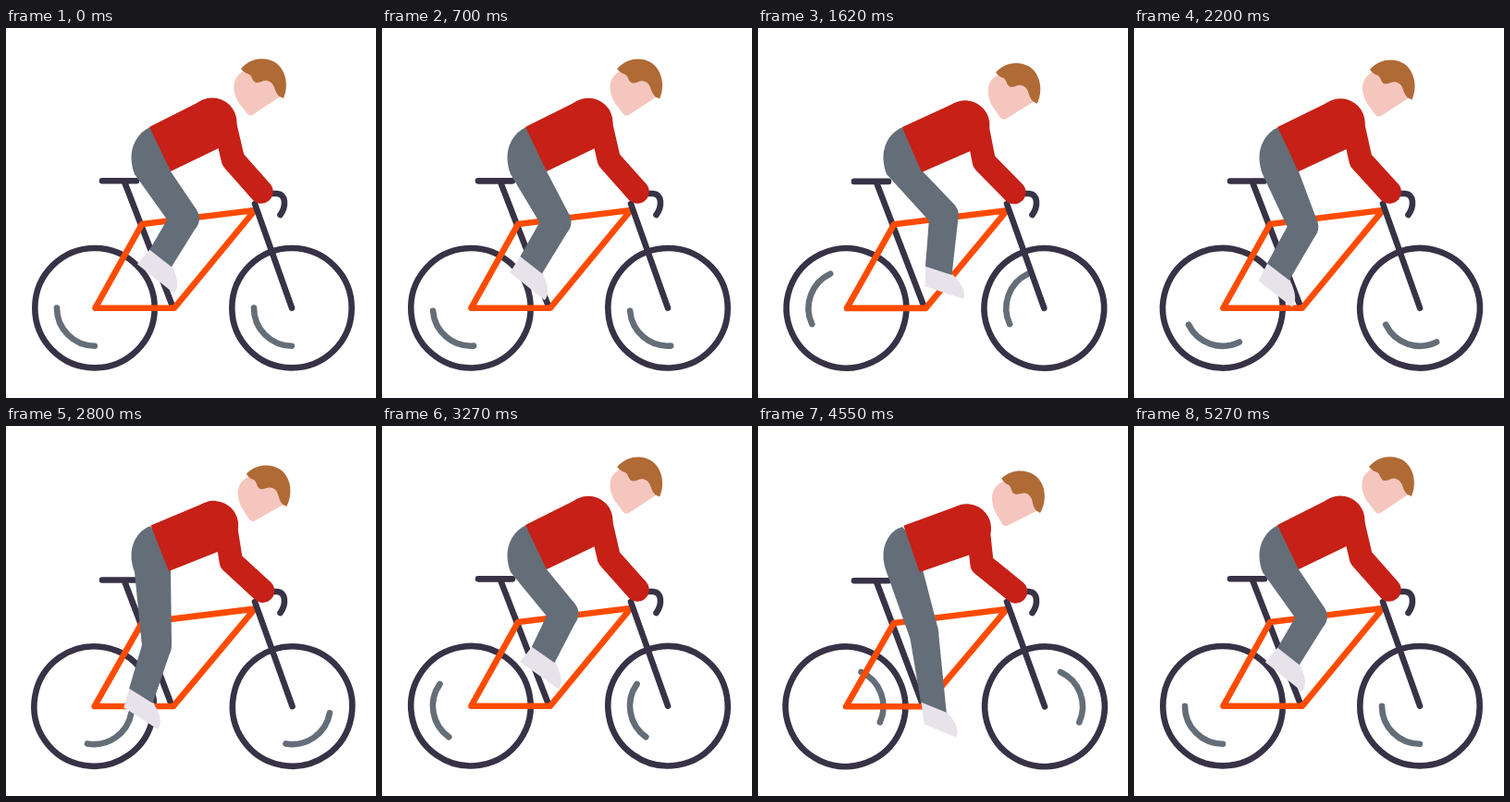
These frames come from a looping animation (400x400 px, 8 s). An HTML page with a canvas:

```html
<!DOCTYPE html>
<html lang="en">
<head>
<meta charset="utf-8">
<title>Cyclist</title>
<style>
  html, body { margin: 0; width: 100%; height: 100%; overflow: hidden; background: #fff; }
  canvas { display: block; width: 400px; height: 400px; }
</style>
</head>
<body>
<canvas id="stage" width="400" height="400"></canvas>
<script>
const ctx = document.getElementById('stage').getContext('2d');
const DARK = '#373246', ORANGE = '#ff4b00', GREY = '#646e78', RED = '#c62017';
const SKIN = '#f5c6be', HAIR = '#b06a35', SHOE = '#e8e2eb';
const LOOP = 8000, RIDE = 5.27, TAU = Math.PI * 2;

// Turns made by the wheels and the pedals over time (seconds); the outer knots only set end speeds.
const TIMES = [-0.7, 0, 0.7, 1.62, 2.8, 3.77, 4.55, RIDE, 5.99];
const WHEEL = [-0.3, 0, 0.986, 3.178, 6.775, 9.314, 10.567, 11, 10.567];
const PEDAL = [-0.3, 0, 0.95, 3.186, 6.714, 9.272, 10.45, 11, 10.45];

// Leg poses around one pedal turn.
const cyclic = v => [v[5], ...v, v[0], v[1]];
const PHASES = [-0.05, 0, 0.186, 0.272, 0.45, 0.714, 0.95, 1, 1.186];
const LEG = {
  kneeX: cyclic([193, 201, 200, 179.5, 163, 188.5]),
  kneeY: cyclic([206, 202, 213, 224, 238, 210]),
  ankleX: cyclic([167, 195, 202, 190, 146, 161]),
  ankleY: cyclic([249, 262, 275, 304, 292, 256.5]),
  tilt: cyclic([38, 18, 9, 22, 32, 38]),
  heel: cyclic([-16, -9, -7, -3, -9, -13])
};

function spline(xs, ys, x) {
  let i = 1;
  while (i < xs.length - 3 && x > xs[i + 1]) i++;
  const slope = k => (ys[k + 1] - ys[k]) / (xs[k + 1] - xs[k]);
  const tangent = k => {
    const a = xs[k] - xs[k - 1], b = xs[k + 1] - xs[k];
    return (slope(k - 1) * b + slope(k) * a) / (a + b);
  };
  const h = xs[i + 1] - xs[i], u = (x - xs[i]) / h, v = 1 - u;
  return ys[i] * (1 + 2 * u) * v * v + ys[i + 1] * (3 - 2 * u) * u * u
    + h * u * v * (tangent(i) * v - tangent(i + 1) * u);
}

function fill(d, color) {
  ctx.fillStyle = color;
  ctx.fill(new Path2D(d));
}

function stroke(d, color, width = 6.6) {
  ctx.strokeStyle = color;
  ctx.lineWidth = width;
  ctx.lineCap = ctx.lineJoin = 'round';
  ctx.stroke(new Path2D(d));
}

function disc(x, y, r, color) {
  ctx.fillStyle = color;
  ctx.beginPath();
  ctx.arc(x, y, r, 0, TAU);
  ctx.fill();
}

function placed(x, y, angle, draw) {
  ctx.save();
  ctx.translate(x, y);
  ctx.rotate(angle);
  draw();
  ctx.restore();
}

function wheel(x, y, angle) {
  placed(x, y, angle, () => {
    stroke('M64.7 0A64.7 64.7 0 1 1 -64.7 0A64.7 64.7 0 1 1 64.7 0Z', DARK);
    stroke('M0 41A41 41 0 0 1 -41 0', GREY);
  });
}

function bike(dip, turn) {
  const rear = 96 - 1.5 * dip, front = 309 + dip, axle = 302.7 + 0.6 * dip;
  const seat = 165.3 + 2 * dip, base = 182 - 2 * dip;
  wheel(rear, axle, turn);
  wheel(front, axle, turn);
  stroke(`M128 ${seat + 1}L${base - 2} ${axle - 2}M104 ${seat}H141`, DARK);
  stroke(`M${rear + 0.5} ${axle}L147 ${212 + dip}L269 ${197 + dip}L${base} ${axle}Z`, ORANGE);
  stroke(`M269 190L${front} ${axle}`, DARK);
  stroke('M287 179H293C303 180 303 193 296.5 202', DARK);
}

function leg(phase, dip) {
  const p = {};
  for (const key in LEG) p[key] = spline(PHASES, LEG[key], phase);
  const { kneeX: kx, kneeY: ky, ankleX: ax, ankleY: ay } = p;
  const side = (angle, r) => [Math.sin(angle) * r, -Math.cos(angle) * r];
  const [tx, ty] = side(Math.atan2(ky - 154, kx - 158), 16);
  const [sx, sy] = side(Math.atan2(ay - ky, ax - kx), 15.7);
  const tilt = p.tilt * Math.PI / 180;
  const cx = Math.cos(tilt) * 15, cy = Math.sin(tilt) * 15;

  fill(`M156 ${107 + 2 * dip}C142 113 135 128 135.5 141Q136 151 139 158L178 155L170 125Z`, GREY);
  fill(`M139 158L160 130L178 155L${kx + tx} ${ky + ty}L${kx - tx} ${ky - ty}Z`, GREY);
  disc(kx, ky, 15.9, GREY);
  placed(ax, ay, tilt, () =>
    fill(`M-15 -1L${p.heel} 20.5L35 21C35 13 30 7 15 -1Z`, SHOE));
  fill(`M${kx + sx} ${ky + sy}L${ax + cx} ${ay + cy}L${ax - cx} ${ay - cy}L${kx - sx} ${ky - sy}Z`, GREY);
}

function rider(dip) {
  ctx.save();
  ctx.translate(150, 128);
  ctx.rotate(dip * 6.9 * Math.PI / 180);
  ctx.translate(-150, -128);
  fill('M155 107L211.5 78.5L240 100L236 127L178 155Z', RED);
  disc(223, 102, 26.5, RED);
  fill('M256 47C246 53 245 63 247.5 71C249 79 256 86 261 93Q264 96 268 93L298 73L285 52L260 46Z', SKIN);
  fill('M254 44C264 32 279 31 289 36C301 42 307 60 300 76L295.5 74C290 69 291 62 286 58.5'
    + 'C279 54 276 60 270 59C265 57 267 50 260 49Q256.5 47.5 254 44Z', HAIR);
  ctx.restore();
  stroke(`M${236 + 2 * dip} ${102 + 9 * dip}L${245.5 - 3.5 * dip} ${142.5 + 7 * dip}`
    + `L${276 + 2.5 * dip} ${177 + 2 * dip}`, RED, 25.4);
}

function frame() {
  const t = Math.min(performance.now() % LOOP / 1000, RIDE);
  const phase = spline(TIMES, PEDAL, t) % 1;
  const dip = (1 - Math.cos(phase * TAU)) / 2;
  ctx.fillStyle = '#fff';
  ctx.fillRect(0, 0, 400, 400);
  bike(dip, spline(TIMES, WHEEL, t) * TAU);
  leg(phase, dip);
  rider(dip);
  requestAnimationFrame(frame);
}
frame();
</script>
</body>
</html>
```
